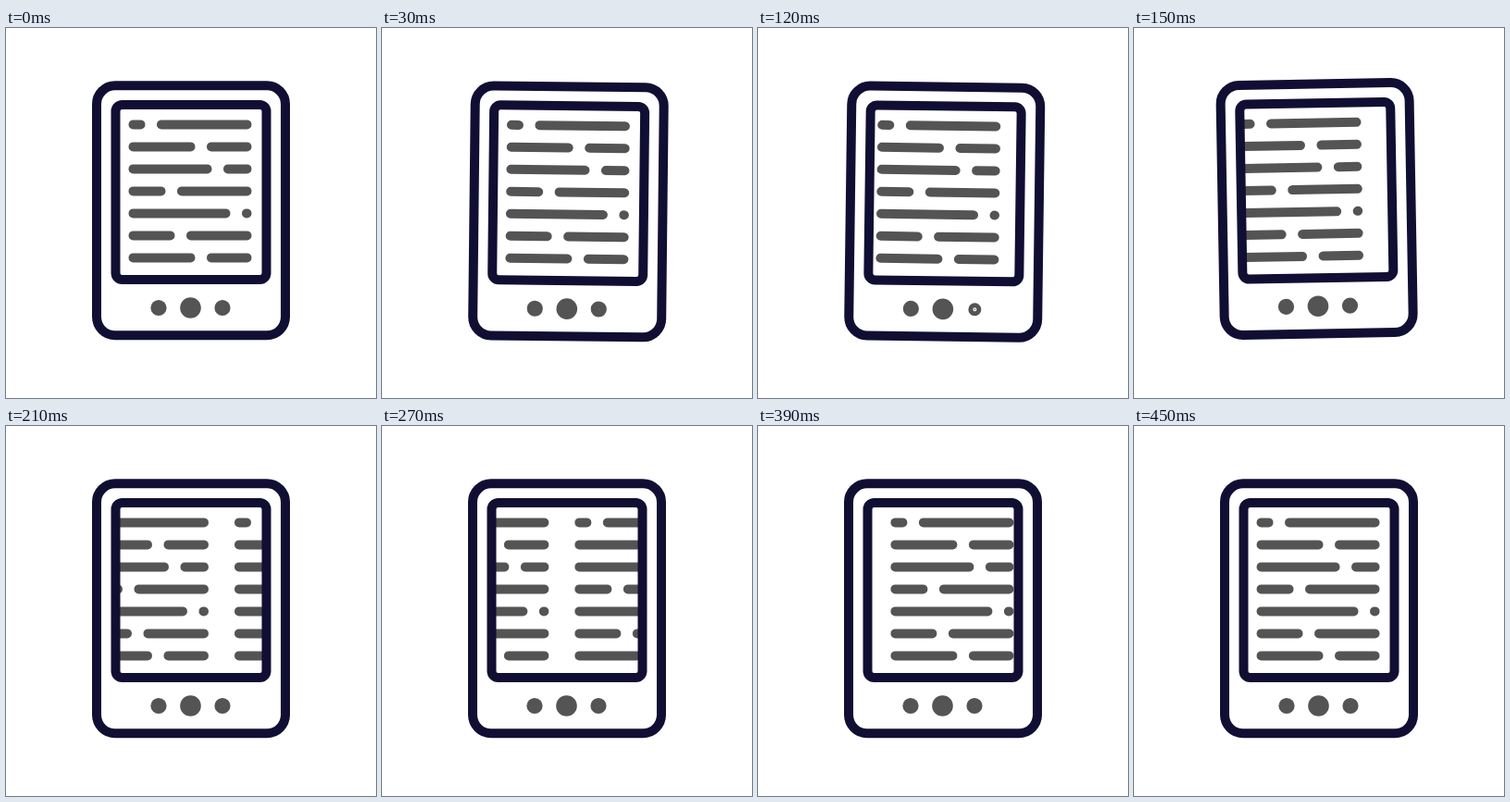
These frames come from a looping animation (400 px wide and 400 px high, 510 ms). An HTML page:

```html
<!DOCTYPE html>
<html lang="en">
<head>
<meta charset="utf-8">
<title>E-reader</title>
<style>
  html, body { margin: 0; height: 100%; overflow: hidden; background: #fff; }
  svg { display: block; width: 100%; height: 100%; }
  .frame { fill: none; stroke: #100f33; stroke-width: 10; }
  .dots { fill: #545454; }
  #text, #button { fill: none; stroke: #545454; }
  #text { stroke-width: 10; stroke-linecap: round; }
</style>
</head>
<body>
<svg viewBox="0 0 400 400">
  <clipPath id="screen"><rect x="120" y="85" width="160" height="185"/></clipPath>
  <g id="reader">
    <g clip-path="url(#screen)"><path id="text"/></g>
    <rect class="frame" x="98" y="62.3" width="204" height="270" rx="20"/>
    <rect class="frame" x="118.5" y="83" width="163" height="189" rx="7"/>
    <g class="dots">
      <circle cx="165" cy="302.5" r="8.6"/>
      <circle cx="199.5" cy="302.5" r="11.3"/>
      <circle cx="234" cy="302.5" r="0.8"/>
    </g>
    <circle id="button" cx="234" cy="302.5" r="4.5"/>
  </g>
</svg>
<script>
  const LOOP = 510, STEP = 30, LAST = 450, PAGE = 161;
  const reader = document.getElementById('reader');
  const text = document.getElementById('text');
  const button = document.getElementById('button');

  // Each row is two strokes; the number is where the first one ends.
  const splits = [145.5, 199.5, 217.5, 167.5, 237.5, 177.5, 199.5];
  const page = x => splits.map((end, i) => {
    const y = 104.4 + 24 * i;
    return `M${137.5 + x} ${y}H${end + x}M${Math.min(end + 22.5, 260) + x} ${y}H${260.5 + x}`;
  }).join('');
  text.setAttribute('d', page(0) + page(PAGE));

  const ease = (t, from, to) => {
    const u = Math.min(1, Math.max(0, (t - from) / (to - from)));
    return (1 - Math.cos(Math.PI * u)) / 2;
  };

  function draw(now) {
    const t = Math.min(LAST, Math.floor(now % LOOP / STEP) * STEP);
    const angle = 2.5 * ease(t, 0, 90) - 3.5 * ease(t, 90, 150) + ease(t, 150, 210);
    const press = ease(t, 30, 90) - ease(t, 90, 150);
    reader.setAttribute('transform', `rotate(${angle} 97 331)`);
    text.setAttribute('transform', `translate(${-PAGE * ease(t, 72, 454)})`);
    button.setAttribute('stroke-width', 8.2 - 6.4 * press);
  }

  const start = performance.now();
  (function tick() {
    draw(performance.now() - start);
    requestAnimationFrame(tick);
  })();
</script>
</body>
</html>
```
